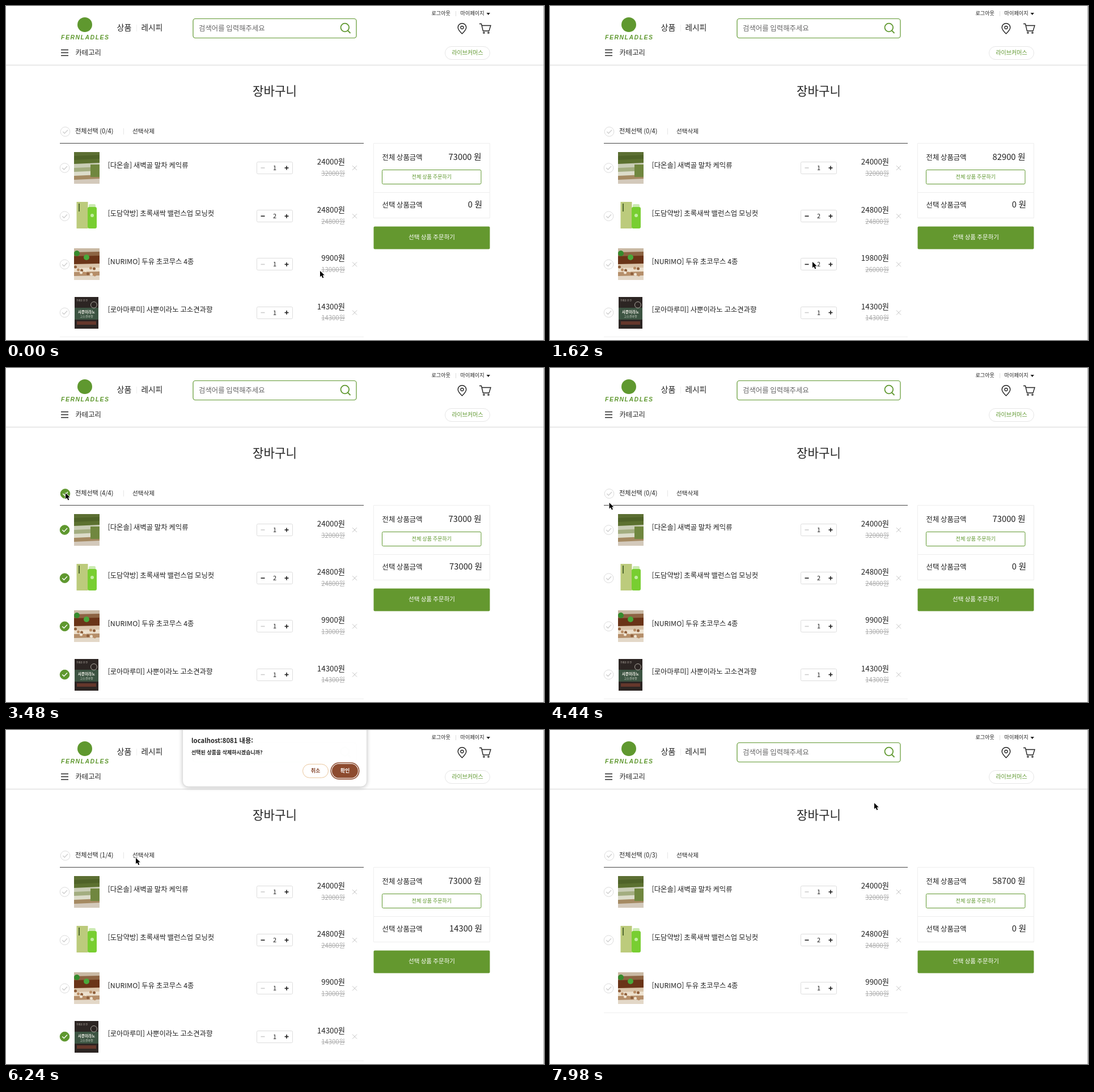
These frames come from a looping animation (949x590 px, 8 s). An HTML page with a canvas:

```html
<!DOCTYPE html>
<html lang="ko">
<head>
<meta charset="utf-8">
<title>장바구니</title>
<style>
html, body { margin: 0; width: 100%; height: 100%; overflow: hidden; background: #fff; }
canvas { display: block; }
#dialog {
  position: absolute; left: 312px; top: -30px; width: 324px; height: 130px;
  box-sizing: border-box; padding: 40px 15px; border-radius: 10px; background: #fff;
  box-shadow: 0 1px 9px rgba(0, 0, 0, .3); transform-origin: 50% 30px;
  font: 700 9px/16px "Noto Sans CJK KR", "Noto Sans CJK", sans-serif; color: #222;
}
#dialog h2 { margin: 0 0 6px; font-size: 11.3px; line-height: 16px; }
#dialog p { margin: 0; }
#dialog span {
  position: absolute; top: 90px; left: 211px; width: 46px; height: 25px; box-sizing: border-box;
  border: 1px solid #e9c69c; border-radius: 13px; line-height: 22px; text-align: center; color: #85452b;
}
#dialog #ok { left: 263px; border-color: transparent; background: #8d4a2e; background-clip: border-box; color: #fff; }
#dialog #ok.ring { box-shadow: 0 0 0 1px #fff, 0 0 0 2.6px #8d4a2e; }
#dialog #ok.hover { background: #a8755a; }
#pointer { position: absolute; left: 0; top: 0; overflow: visible; }
</style>
</head>
<body>
<canvas id="stage" width="949" height="590"></canvas>
<div id="dialog">
  <h2>localhost:8081 내용:</h2>
  <p>선택된 상품을 삭제하시겠습니까?</p>
  <span>취소</span><span id="ok">확인</span>
</div>
<svg id="pointer" width="10" height="14">
  <path d="M0 0V10.5L2.5 8.3 4.4 12.6 6.3 11.8 4.5 7.6 7.8 7.5Z" stroke="#fff" stroke-width="1.6" stroke-linejoin="round" paint-order="stroke"/>
</svg>
<script>
const $ = id => document.getElementById(id);
const ctx = $('stage').getContext('2d');
const LOOP = 8000;
const GREEN = '#5f982f', INK = '#222', PALE = '#eee', GREY = '#aaa';
const KR = '"Noto Sans CJK KR", "Noto Sans CJK", sans-serif';
const LEFT = 95, LIST_W = 536, ROW_Y = 286, ROW_H = 85.2;

// Moments of the clicks and their results
const AT = { plus: 990, minus: 1890, all: 3060, none: 3780, pick: 5100,
             open: 6060, hover: 6930, press: 7150, close: 7210, remove: 7500 };

const items = [
  { name: '[다온솔] 새벽골 말차 케익류', price: 24000, old: 32000, qty: 1, photo: cake },
  { name: '[도담약방] 초록새싹 밸런스업 모닝컷', price: 24800, old: 24800, qty: 2, photo: bottle },
  { name: '[NURIMO] 두유 초코무스 4종', price: 9900, old: 13000, qty: 1, photo: mousse },
  { name: '[로아마루미] 사뿐이라노 고소견과향', price: 14300, old: 14300, qty: 1, photo: pouch }
];

// The pointer rests between these moves
const home = { x: 554, y: 468 };
const moves = [
  { from: 480, to: 900, x: 495, y: 455 },
  { from: 1170, to: 1830, x: 453, y: 451 },
  { from: 2010, to: 2670, x: 115.5, y: 199 },
  { from: 2670, to: 2850, x: 105, y: 221 },
  { from: 4350, to: 5000, x: 97, y: 538 },
  { from: 5280, to: 5970, x: 229, y: 226 },
  { from: 6360, to: 6960, x: 597, y: 67 },
  { from: 7620, to: 7980, x: 572, y: 129 }
];

const clamp = v => Math.max(0, Math.min(1, v));
const ease = u => u * u * (3 - 2 * u);
const part = (t, from, to) => clamp((t - from) / (to - from));

function pointerAt(t) {
  let { x, y } = home;
  for (const m of moves) {
    const k = ease(part(t, m.from, m.to));
    x += (m.x - x) * k;
    y += (m.y - y) * k;
  }
  return { x, y };
}

function text(s, x, cy, size, color = INK, align = 'left', weight = 400) {
  ctx.font = `${weight} ${size}px ${KR}`;
  ctx.fillStyle = color;
  ctx.textAlign = align;
  ctx.fillText(s, x, cy + size * 0.37);
}

function stroke(d, color = INK, width = 1.4) {
  ctx.strokeStyle = color;
  ctx.lineWidth = width;
  ctx.stroke(new Path2D(d));
}

function rect(color, x, y, w, h) {
  ctx.fillStyle = color;
  ctx.fillRect(x, y, w, h);
}

function box(x, y, w, h, r, fill, edge, width = 1) {
  ctx.beginPath();
  ctx.roundRect(x, y, w, h, r);
  if (fill) { ctx.fillStyle = fill; ctx.fill(); }
  if (edge) { ctx.strokeStyle = edge; ctx.lineWidth = width; ctx.stroke(); }
}

const disc = (x, y, r, fill, edge, width) => box(x - r, y - r, r * 2, r * 2, r, fill, edge, width);
const dash = (x, y, r, color, width) => stroke(`M${x - r} ${y}h${r * 2}`, color, width);

function tick(x, y, on) {
  disc(x, y, 8.3, on ? GREEN : '#fff', on ? GREEN : '#dcdcdc');
  stroke(`M${x - 4.2} ${y}l3 3 5.7 -6`, on ? '#fff' : '#cfcfcf');
}

// Product pictures fill a 45 by 56 area
function bands(colors, tilt = 0) {
  const h = 56 / colors.length;
  colors.forEach((c, i) => {
    ctx.fillStyle = c;
    ctx.fill(new Path2D(`M0 ${i * h}L45 ${i ? i * h - tilt : 0}V56H0Z`));
  });
}

function blobs(colors, count, top, size) {
  for (let i = 0; i < count; i++) {
    disc(size + i * 17 % (45 - size * 2), top + i * 7 % 15, size, colors[i % colors.length]);
  }
}

function cake() {
  bands(['#5c6f33', '#4f6328', '#5c7130', '#c9cdb6', '#a3ad80', '#dcdcca', '#a58a62', '#d3c9bb'], 2);
  rect('#70873f', 29, 22, 16, 22);
}

function bottle() {
  rect('#bccb7c', 4.5, 3, 20, 47);
  rect('#526b30', 8, 6, 2, 14);
  box(26, 7, 12, 8, 2, '#cbeab1');
  box(24, 12, 16, 38, 3, '#78ce31');
  disc(32, 27, 3, '#c2eda1');
}

function mousse() {
  bands(['#c9b9a4', '#8d6443', '#6a3418', '#6a3418', '#d9c4aa', '#ecdfcc', '#b58f6b', '#e3d8c8'], 1);
  blobs(['#8f5f3b', '#efe4d2', '#b98d65'], 12, 33, 2.5);
  blobs(['#368b2d', '#49a93b'], 2, 9, 5);
}

function pouch() {
  rect('#2c2523', 1, 0, 42, 56);
  rect('#3c5442', 1, 19, 42, 21);
  disc(35, 14, 5.5, null, '#c9c4bb', 0.8);
  text('가벼운 한 잔', 4, 7, 4, '#bcb5ac');
  text('사뿐이라노', 22, 27, 6.5, '#f0eee7', 'center', 700);
  text('고소견과향', 22, 34, 5, '#d8ddd2', 'center');
  rect('#65372c', 5, 43, 34, 6);
}

function header() {
  disc(139, 33, 13, GREEN);
  ctx.font = 'italic 700 10.5px "Liberation Sans", sans-serif';
  ctx.letterSpacing = '1.5px';
  ctx.textAlign = 'left';
  ctx.fillText('FERNLADLES', 97, 59);
  ctx.letterSpacing = '0px';

  text('상품', 195.5, 38, 14);
  rect(PALE, 230, 33, 1, 12);
  text('레시피', 238.5, 38, 13.7);
  for (let i = 0; i < 3; i++) dash(103.5, 77.5 + i * 5, 6.5, INK, 1.5);
  text('카테고리', 122.5, 82, 12.3);

  box(330, 22.5, 288, 34, 4, '#fff', GREEN, 1.2);
  text('검색어를 입력해주세요', 340, 39, 12.4, '#666');
  disc(597.8, 38, 7.3, null, GREEN, 1.8);
  stroke('M603 43.5l4.5 4.5', GREEN, 1.8);

  text('로그아웃', 750.5, 13, 9.1);
  rect('#ddd', 793, 9, 1, 9);
  text('마이페이지', 801.5, 13, 9.2);
  ctx.fillStyle = INK;
  ctx.fill(new Path2D('M847.5 12h6.5l-3.2 4z'));
  stroke('M804.5 49Q797.2 42 797.2 38a7.3 7.3 0 0 1 14.6 0Q811.8 42 804.5 49z');
  disc(804.5, 38, 2.5, null, INK, 1.3);
  stroke('M835 31.5h3.5l3 12.5h10.5l3 -9.5h-15.5');
  for (const x of [843, 851]) disc(x, 47.3, 1.2, null, INK, 1.2);
  box(774.5, 71.5, 79, 23, 11.5, '#fff', '#e6e6e6');
  text('라이브커머스', 814, 82, 10, GREEN, 'center');
  rect('#e8e8e8', 0, 103.5, 949, 2);
}

function row(item, i, qty, on) {
  const y = ROW_Y + i * ROW_H;
  const times = qty / item.qty;
  tick(103.5, y, on);
  ctx.save();
  ctx.translate(120, Math.round(y - 28));
  item.photo();
  ctx.restore();
  text(item.name, 179.5, y - 5, 12.4);

  box(442.5, Math.round(y - 11) + 0.5, 63, 21, 2, '#fff', '#ddd');
  dash(453, y, 3.5, qty > 1 ? INK : '#ccc', 1.6);
  dash(495, y, 3.5, INK, 1.6);
  stroke(`M495 ${y - 3.5}v7`, INK, 1.6);
  text(qty, 474, y, 11, INK, 'center');

  text(item.price * times + '원', 598, y - 11, 13.3, INK, 'right');
  const old = item.old * times + '원';
  text(old, 598, y + 9.5, 11.3, GREY, 'right');
  const half = ctx.measureText(old).width / 2;
  dash(598 - half, y + 9.5, half, GREY, 1);
  stroke(`M611 ${y - 4}l8 8m0 -8l-8 8`, '#c4c4c4', 1);
}

function summary(total, chosen) {
  box(648.5, 242.5, 205, 132, 0, null, PALE);
  rect(PALE, 649, 329, 204, 1);
  text('전체 상품금액', 663.5, 267, 12.4);
  text(total + ' 원', 838.5, 267, 14.8, INK, 'right');
  box(663.5, 289.5, 174.5, 25, 2, '#fff', GREEN);
  text('전체 상품 주문하기', 751, 301.5, 9, GREEN, 'center');
  text('선택 상품금액', 663.5, 351, 12.4);
  text(chosen + ' 원', 840, 351, 14.8, INK, 'right');
  box(648.5, 389.5, 205, 40, 2, '#64982f');
  text('선택 상품 주문하기', 751, 408.5, 10.5, '#fff', 'center');
}

function showDialog(t) {
  const shown = ease(part(t, AT.open, AT.open + 190)) * (1 - part(t, AT.close, AT.close + 200));
  $('dialog').style.opacity = shown;
  $('dialog').style.transform = `translateY(${-20 * (1 - shown)}px) scale(${0.93 + 0.07 * shown})`;
  $('ok').classList.toggle('ring', t < AT.press);
  $('ok').classList.toggle('hover', t >= AT.hover);
}

function draw(t) {
  const all = t >= AT.all && t < AT.none;
  const more = t >= AT.plus && t < AT.minus;
  const list = t < AT.remove ? items : items.slice(0, -1);
  let total = 0, chosen = 0, count = 0;

  rect('#fff', 0, 0, 949, 590);
  header();
  text('장바구니', 474, 150, 21.2, INK, 'center');
  list.forEach((item, i) => {
    const on = all || (i === 3 && t >= AT.pick);
    const qty = item.qty + (more && i === 2 ? 1 : 0);
    const sum = item.price * qty / item.qty;
    total += sum;
    if (on) { chosen += sum; count++; }
    row(item, i, qty, on);
  });
  tick(104.5, 222, all);
  text(`전체선택 (${count}/${list.length})`, 122, 221, 11.1);
  rect('#e6e6e6', 207, 216, 1, 11);
  text('선택삭제', 223, 221, 10.6);
  rect('#444', LEFT, 242, LIST_W, 1);
  rect(PALE, LEFT, Math.round(243 + list.length * ROW_H), LIST_W, 1);
  summary(total, chosen);
  rect(GREY, 948, 0, 1, 590);

  showDialog(t);
  const { x, y } = pointerAt(t);
  $('pointer').style.transform = `translate(${x}px, ${y}px)`;
}

const start = performance.now();
function play() {
  draw((performance.now() - start) % LOOP);
  requestAnimationFrame(play);
}
play();
</script>
</body>
</html>
```
